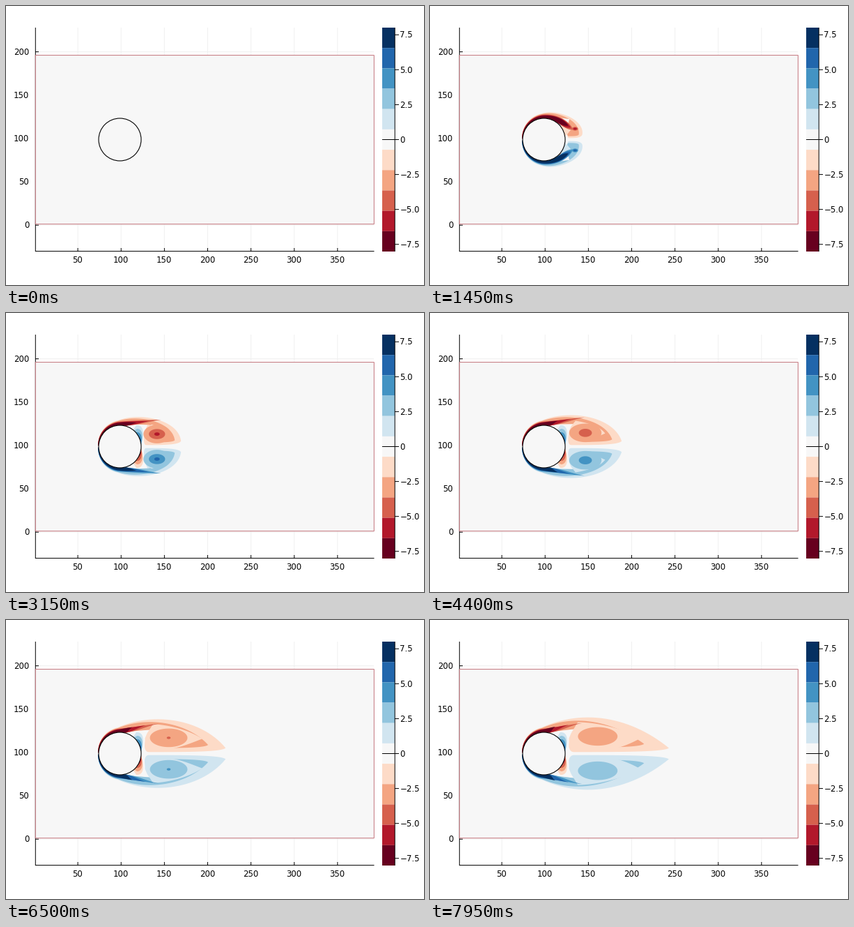
A matplotlib script for the animation above (8 s loop, 600 by 400 pixels).

```python
import numpy as np
import matplotlib.pyplot as plt
from matplotlib.animation import FuncAnimation
from matplotlib.patches import Circle, Polygon, Rectangle

W, H, DPI = 600, 400, 100
FRAMES, STEP = 160, 50
PX = 72 / DPI
CX, CY, R = 163.5, 191.5, 30.5

REDS = ["#fddbc7", "#f4a582", "#d6604d", "#b2182b", "#67001f"]
BLUES = ["#d1e5f0", "#92c5de", "#4393c3", "#2166ac", "#053061"]
PALE = "#f7f7f7"


# Wake shapes are lists of (x, height above the centre line).

def ramp(t, start, length):
    return min(1, max(0, (t - start) / length))


def bezier(*p):
    a, b, c, d = np.array(p, float)
    s = np.linspace(0, 1, 30)[:, None]
    r = 1 - s
    return r**3 * a + 3 * r * r * s * b + 3 * r * s * s * c + s**3 * d


def front(t, level):
    """Boundary layer over the upstream face, thickening with time."""
    turn = np.linspace(.02, .95, 24)
    grow = min(1, (t / 1.3) ** .4)
    rad = R + grow * (.8 + (7.5 - .9 * level) * turn ** 1.2)
    ang = np.pi * (1 - turn / 2)
    return np.column_stack([CX + rad * np.cos(ang), rad * np.sin(ang)])


def tail_x(t, level):
    reach = 191 + 19.1 * t
    return reach if level == 1 else reach - 4 - .5 * t * t


def crest(t, start, tail, inset):
    """Upper edge of the lobe, from the cylinder to the wake tip."""
    d = tail[0] - CX
    return bezier(start,
                  (CX + .33 * d, start[1] + 2 + 3.3 * t - inset),
                  (CX + (1.12 - .052 * t) * d,
                   18 + 38 * (1 - np.exp(-t / 4)) - inset),
                  tail)


def lobe(t, level):
    arc = front(t, level)
    x = tail_x(t, level)
    left = min(195 + 3 * level, x - 16)
    tail = (x, 8 if level == 1 else 6 + t)
    low = 2.2 if level == 1 else 4 + .6 * t
    d = x - left
    corner = (left + .06 * d, low)
    spur = (left + 1.7 * t, 28 + t)
    return np.vstack([
        arc,
        crest(t, arc[-1], tail, .8 * t * (level - 1)),
        bezier(tail, (x - .05 * d, low), (left + .5 * d, low), corner),
        bezier(corner, (left - 2, low), (left - 1, .6 * spur[1]), spur),
        [(180, 32), (170, 29)]])


def gap(t):
    """Weaker fluid rolled in between the arm and the core."""
    x = tail_x(t, 2) - 10 + 3.2 * max(0, t - 6)
    left = min(199.5, x - 16)
    tail = (x, 14 + 1.1 * t)
    d = x - left
    top = crest(t, front(t, 2)[-1], tail, 8.5 + .2 * t)
    drop = .4 + .5 * ramp(t, 6, 2)
    return np.vstack([
        top[top[:, 0] > left + 9],
        bezier(tail, (x - .35 * d, tail[1] * (1 - drop)),
               (left + .5 * d, 4.5), (left + 4, 4.5)),
        [(left, 9), (left, 22), (left + 3, 29)]])


def core(level):
    def shape(t):
        grow = ramp(t, 1, 1.5)
        if level == 2:
            rx, ry = 31 * (1 - np.exp(-t / 3.2)), 13.3
        else:
            size, end = (16, 6.7) if level == 3 else (11, 3.6)
            rx = size * np.sqrt(max(0, 1 - t / end))
            ry = .62 * rx
        a = np.linspace(0, 2 * np.pi, 60)
        return np.column_stack([201 + 5 * t + grow * rx * np.cos(a),
                                13.5 + 1.4 * t + grow * ry * np.sin(a)])
    return shape


def streak(level):
    """Strong shear layer: first wraps the cylinder, then lifts off."""
    def shape(t):
        k = level - 3
        arc = front(t, level)
        lift = ramp(t, 1.2, 2.4)
        lift *= lift * (3 - 2 * lift)
        early = np.array([192 + 9 * t - 3 * k, 13.5 + 3 * k])
        late = np.array([226 - 19 * k - t, 39.5 - 2.5 * k + .5 * t])
        tip = early + (late - early) * lift
        dx, dv = tip - arc[-1]
        return np.vstack([
            arc,
            bezier(arc[-1], arc[-1] + (.45 * dx, 2),
                   tip + (-.15 * dx, max(0, -dv) * .65), tip),
            bezier(tip, tip - (.25 * dx, 2),
                   (170 + .3 * dx, 30 + .15 * dv), (170, 30))])
    return shape


def backflow(level):
    """Layer of opposite sign on the downstream face."""
    def shape(t):
        k = level
        shift = 10 * (1 - ramp(t, .4, 1 + .3 * k))
        edge = bezier((186 + k, 35.5 - 5 * k), (203 - 3 * k, 37.5 - 6 * k),
                      (198.7 - .8 * k, 13.5), (193.5, 1.5))
        return np.vstack([edge, [(180, 4), (180, 20)]]) - (shift, 0)
    return shape


LAYERS = [(backflow(k), -k) for k in range(1, 5)]
LAYERS += [(lambda t: lobe(t, 1), 1), (lambda t: lobe(t, 2), 2), (gap, 1),
           (core(2), 2), (core(3), 3), (streak(3), 3), (core(4), 4),
           (streak(4), 4), (streak(5), 5)]

fig = plt.figure(figsize=(W / DPI, H / DPI), dpi=DPI, facecolor="white")
ax = fig.add_axes([0, 0, 1, 1])
ax.set(xlim=(0, W), ylim=(H, 0))
ax.axis("off")


def line(x0, y0, x1, y1, color="black", z=2):
    ax.plot([x0, x1], [y0, y1], color=color, lw=PX, zorder=z,
            solid_capstyle="butt", snap=False)


def label(x, y, text, ha):
    ax.text(x, y + 4.2, text, ha=ha, va="baseline", family="DejaVu Sans",
            fontsize=11.7 * PX)


def draw_frame():
    for i in range(7):
        x = 103.1 + 62.13 * i
        line(x, 31, x, 351, "#f0f0f0", 1)
        line(x, 352, x, 347)
        label(x - .3, 363.5, str(50 * (i + 1)), "center")
    for i in range(5):
        y = 314.2 - 62.13 * i
        line(42, y, 528, y, "#f0f0f0", 1)
        line(42, y, 47, y)
        label(33.2, y, str(50 * i), "right")
    line(42.3, 31, 42.3, 352)
    line(42, 351.6, 528.5, 351.6)
    ax.add_patch(Rectangle((42.3, 70.6), 486, 242.1, fc=PALE, ec="#c4747c",
                           lw=PX, zorder=3, snap=False))


def draw_colorbar():
    colors = BLUES[::-1] + [PALE] + REDS
    h = 321 / 11
    for i, c in enumerate(colors):
        ax.add_patch(Rectangle((540, 31 + i * h), 18, h, fc=c, lw=0, zorder=2,
                               snap=False))
    line(558.2, 31, 558.2, 352, z=3)
    for v in np.arange(-7.5, 8, 2.5):
        y = 191.5 - 20.03 * v
        line(558 if v else 540, y, 564, y, z=3)
        label(565.3, y, f"{v:.1f}".replace("-", "\u2212") if v else "0", "left")


draw_frame()
draw_colorbar()

patches = []
for _, level in LAYERS:
    pair = [REDS, BLUES] if level > 0 else [BLUES, REDS]
    patches.append([Polygon([(0, 0)] * 3, fc=p[abs(level) - 1], lw=0, zorder=4)
                    for p in pair])
    for p in patches[-1]:
        ax.add_patch(p)
ax.add_patch(Circle((CX, CY), R, fc=PALE, ec="black", lw=1.1 * PX, zorder=5))


def draw(i):
    t = i * STEP / 1000
    for (shape, _), pair in zip(LAYERS, patches):
        xy = shape(t)
        for patch, side in zip(pair, (-1, 1)):
            patch.set_visible(i > 0)
            patch.set_xy(np.column_stack([xy[:, 0], CY + side * xy[:, 1]]))
    return [p for pair in patches for p in pair]


def reset():
    return draw(0)


anim = FuncAnimation(fig, draw, frames=FRAMES, init_func=reset, interval=STEP,
                     repeat=True, repeat_delay=0, blit=False)
plt.show()
```
